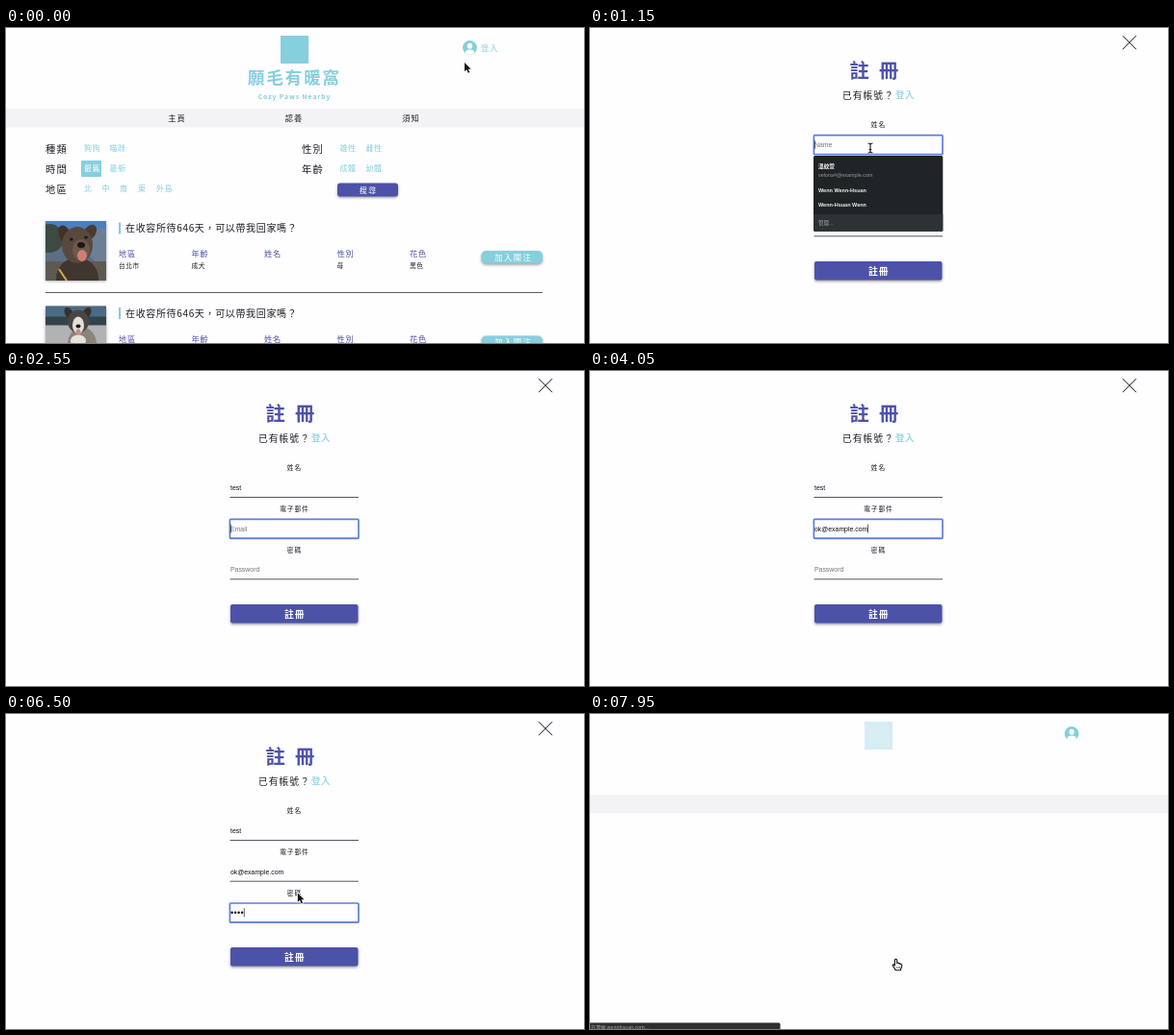
Animation of 600 by 328 pixels, one loop 8 s. Source, as an HTML page with a canvas:

```html
<!DOCTYPE html>
<html lang="zh-Hant">
<head>
<meta charset="utf-8">
<title>註冊</title>
<style>
html, body { margin: 0; width: 100%; height: 100%; overflow: hidden; background: #fefdff; }
canvas { display: block; width: 100vw; height: 100vh; }
</style>
</head>
<body>
<canvas></canvas>
<script>
const W = 600, H = 328, LOOP = 8000;
const canvas = document.querySelector('canvas');
const ctx = canvas.getContext('2d');
const CJK = '"Noto Sans CJK TC", "Noto Sans CJK JP", "Noto Sans CJK", sans-serif';
const SANS = '"Liberation Sans", sans-serif';
const PAPER = '#fefdff', AQUA = '#86cfdd', INDIGO = '#4c52a8', INK = '#1c1c1f';
const EMAIL = 'ok@example.com';
const NAME_KEYS = [1350, 1450, 1550, 1650];
const EMAIL_KEYS = [2700, 2750, 2950, 3000, 3200, 3500, 3600, 3650, 3750, 3900, 3950, 4000, 4000, 4050];
const PASS_KEYS = [6100, 6150, 6150, 6250];
const CARET_OFF = [2350, 4550, 5650];

// Cursor stops: time, x, y
const ENTER_PATH = [[0, 476, 36], [80, 476, 36], [380, 499, 21], [620, 499, 21], [1050, 291, 125]];
const SUBMIT_PATH = [[5300, 292, 128], [5350, 292, 128], [5500, 295, 152], [6380, 295, 152],
  [6720, 322, 271], [6900, 319, 261]];

const clamp = v => Math.min(1, Math.max(0, v));
const ramp = (t, a, b) => { const u = clamp((t - a) / (b - a)); return u * u * (3 - 2 * u); };
const typed = (keys, t) => keys.filter(k => t >= k).length;

function text(s, x, y, size, color, { weight = 400, gap = 0, font = CJK, center = false } = {}) {
  ctx.font = `${weight} ${size}px ${font}`;
  ctx.letterSpacing = gap + 'px';
  ctx.fillStyle = color;
  const left = center ? x - (ctx.measureText(s).width - gap) / 2 : x;
  ctx.fillText(s, left, y + size * 0.37);
}

function rect(x, y, w, h, color, r = 0) {
  ctx.fillStyle = color;
  ctx.beginPath();
  ctx.roundRect(x, y, w, h, r);
  ctx.fill();
}

function raised(x, y, w, h, color, r) {
  ctx.save();
  ctx.shadowColor = 'rgba(0,0,0,.38)';
  ctx.shadowBlur = 3;
  ctx.shadowOffsetY = 1.3;
  rect(x, y, w, h, color, r);
  ctx.restore();
}

function oval(x, y, rx, ry, color, turn = 0) {
  ctx.fillStyle = color;
  ctx.beginPath();
  ctx.ellipse(x, y, rx, ry, turn, 0, 7);
  ctx.fill();
}

function line(x1, y1, x2, y2, color, width = 1) {
  ctx.strokeStyle = color;
  ctx.lineWidth = width;
  ctx.beginPath();
  ctx.moveTo(x1, y1);
  ctx.lineTo(x2, y2);
  ctx.stroke();
}

function avatar(x, y) {
  ctx.save();
  ctx.beginPath();
  ctx.arc(x, y, 7.4, 0, 7);
  ctx.clip();
  rect(x - 8, y - 8, 16, 16, AQUA);
  oval(x, y - 1.8, 2.6, 2.9, '#fff');
  oval(x, y + 5.2, 4.6, 3.2, '#fff');
  ctx.restore();
}

function logo(alpha) {
  ctx.globalAlpha *= alpha;
  rect(285, 8, 29, 29, AQUA);
  ctx.globalAlpha /= alpha;
}

function photo(y, drawScene) {
  raised(41, y, 63, 62, '#777');
  ctx.save();
  ctx.beginPath();
  ctx.rect(41, y, 63, 62);
  ctx.clip();
  ctx.translate(41, y);
  drawScene();
  ctx.restore();
}

function brownDog() {
  rect(0, 0, 63, 62, '#5b6f83');
  rect(0, 0, 63, 18, '#4a7fc0');
  oval(4, 18, 15, 15, '#3d4a42');
  oval(58, 26, 14, 18, '#6d7f93');
  rect(0, 42, 63, 20, '#5e5a52');
  oval(33, 60, 22, 22, '#40352f');
  oval(20, 14, 6, 10, '#40322b', -0.4);
  oval(46, 12, 6, 9, '#4a3a31', 0.6);
  oval(33, 25, 16, 19, '#59483d');
  oval(37, 30, 9, 11, '#6c594c');
  oval(38, 36, 5, 6, '#cf7d78');
  oval(37, 25, 4, 3, '#1b1817');
  oval(27, 19, 1.8, 1.6, '#1b1817');
  oval(42, 17, 1.8, 1.6, '#1b1817');
  line(14, 50, 22, 62, '#d6ab4a', 2);
}

function paleDog() {
  rect(0, 0, 63, 62, '#b1b2b4');
  rect(0, 0, 63, 15, '#4a6a86');
  rect(0, 11, 63, 9, '#33424a');
  oval(38, 40, 15, 18, '#8c8479');
  oval(24, 7, 4, 6, '#35312f', -0.5);
  oval(43, 7, 4, 6, '#35312f', 0.5);
  oval(34, 16, 11, 12, '#4b4643');
  oval(34, 20, 6, 9, '#e3ded9');
  oval(34, 21, 2.5, 2, '#201d1c');
  oval(34, 27, 2.4, 3, '#c98a88');
  oval(34, 36, 8, 6, '#e6e3df');
}

function card(y, scene) {
  photo(y, scene);
  rect(117, y + 1.5, 2.2, 12, AQUA);
  text('在收容所待646天，可以帶我回家嗎？', 124, y + 7.5, 10, INK, { gap: 0.65 });
  ['地區', '年齡', '姓名', '性別', '花色'].forEach((s, i) =>
    text(s, 117 + i * 75.5, y + 34, 8.2, INDIGO, { weight: 500, gap: 0.9 }));
  ['台北市', '成犬', '', '母', '黑色'].forEach((s, i) =>
    text(s, 117 + i * 75.5, y + 47, 6.7, INK, { gap: 0.6 }));
  raised(493.5, y + 31, 63.5, 13.5, AQUA, 5);
  text('加入關注', 526, y + 37.5, 8.3, '#fff', { weight: 500, gap: 1.5, center: true });
  line(41, y + 74.5, 557, y + 74.5, '#5c5c60');
}

function filterRow(label, x, y, options) {
  text(label, x, y, 10.3, INK, { weight: 500, gap: 1.2 });
  options.forEach(([s, left, color = AQUA]) => text(s, left, y - 0.5, 8, color, { gap: 0.4 }));
}

function home() {
  rect(0, 0, W, H, PAPER);
  logo(1);
  text('願毛有暖窩', 298.5, 52, 17.4, AQUA, { weight: 900, gap: 2, center: true });
  text('Cozy Paws Nearby', 299, 72, 6.7, AQUA, { weight: 700, gap: 1, center: true });
  avatar(481.5, 20.5);
  text('登入', 493, 20.5, 8.2, AQUA, { gap: 1 });
  rect(0, 84, W, 19.5, '#f3f2f4');
  ['主頁', '認養', '須知'].forEach((s, i) =>
    text(s, 177 + i * 121.5, 94, 8.2, INK, { weight: 500, gap: 1, center: true }));

  rect(78, 138, 21, 17, AQUA, 1);
  filterRow('種類', 41, 126, [['狗狗', 81], ['喵咪', 107.5]]);
  filterRow('時間', 41, 147, [['最舊', 81, '#fff'], ['最新', 107.5]]);
  filterRow('地區', 41, 168, [['北', 81], ['中', 99.5], ['南', 118], ['東', 137], ['外島', 156]]);
  filterRow('性別', 307, 126, [['雄性', 346.5], ['雌性', 373.5]]);
  filterRow('年齡', 307, 147, [['成體', 346.5], ['幼體', 373.5]]);
  raised(344, 161.5, 63, 14, INDIGO, 3);
  text('搜尋', 375.5, 168.5, 8.2, '#fff', { weight: 500, gap: 1.2, center: true });

  card(201, brownDog);
  card(289.5, paleDog);
}

function field(label, hint, value, y, focused, caretOn) {
  text(label, 299, y - 20.5, 6.7, INK, { weight: 500, gap: 0.9, center: true });
  line(232.5, y + 10, 366, y + 10, '#58585c');
  if (focused) {
    ctx.strokeStyle = '#5b80dc';
    ctx.lineWidth = 1.7;
    ctx.beginPath();
    ctx.roundRect(232.4, y - 9.8, 133.6, 20, 0.8);
    ctx.stroke();
  }
  let end = 233;
  if (value[0] === '•') {
    for (let i = 0; i < value.length; i++) oval(234.6 + i * 3.5, y, 1.25, 1.25, '#111');
    end += value.length * 3.5;
  } else {
    text(value || hint, 233, y, 6.9, value ? '#111' : '#75757a', { font: SANS });
    if (value) end += ctx.measureText(value).width;
  }
  if (focused && caretOn) line(end + 0.3, y - 4.5, end + 0.3, y + 4.5, '#222', 0.7);
}

function suggestions() {
  rect(232, 133, 134.3, 78.7, '#202426', 1.5);
  rect(232, 194, 134.3, 17.7, '#2d3234', [0, 0, 1.5, 1.5]);
  text('溫紋萱', 237, 144, 5.7, '#eee', { weight: 700 });
  text('velona4@example.com', 237, 153, 5.4, '#96999a', { font: SANS });
  text('Wenn Wenn-Hsuan', 237, 168.5, 5.5, '#eee', { weight: 700, font: SANS });
  text('Wenn-Hsuan Wenn', 237, 184, 5.5, '#eee', { weight: 700, font: SANS });
  text('管理...', 237, 203, 5.4, '#a6a9aa');
}

function register(t) {
  rect(0, 0, W, H, PAPER);
  line(553, 8.2, 567, 22.2, '#111');
  line(567, 8.2, 553, 22.2, '#111');
  text('註冊', 295, 44, 20.3, INDIGO, { weight: 700, gap: 10.2, center: true });
  text('已有帳號？', 262, 70, 9.7, INK, { gap: 1.1 });
  text('登入', 317, 69.5, 9.5, '#72cbe0', { gap: 0.6 });

  const focus = t < 1100 ? '' : t < 1950 ? 'name' : t < 5000 ? 'email' : t < 7000 ? 'pass' : '';
  const caretOn = !CARET_OFF.some(a => t >= a && t < a + 200);
  field('姓名', 'Name', 'test'.slice(0, typed(NAME_KEYS, t)), 121.5, focus === 'name', caretOn);
  field('電子郵件', 'Email', EMAIL.slice(0, typed(EMAIL_KEYS, t)), 164.2, focus === 'email', caretOn);
  field('密碼', 'Password', '•'.repeat(typed(PASS_KEYS, t)), 206.8, focus === 'pass', caretOn);

  if (t >= 7000 && t < 7400)
    text('請輸入密碼', 299, 228, 7, '#b3303f', { weight: 500, gap: 0.7, center: true });

  const hover = ramp(t, 6780, 6950), grow = 2 * hover;
  if (t >= 7000) rect(229, 240.8, 141, 24.4, '#b4dce8', 2.5);
  raised(233 - grow, 243 - grow / 4, 132.5 + 2 * grow, 19.6 + grow / 2,
    `rgb(${76 + 31 * hover},${82 + 29 * hover},${168 + 18 * hover})`, 2);
  text('註冊', 299.3, 253, 9.8, '#fff', { weight: 700, gap: 0.8, center: true });

  if (t >= 1100 && t < 1350) suggestions();
}

function loading(t) {
  rect(0, 0, W, H, PAPER);
  if (t >= 7750) {
    rect(0, 84, W, 19.5, '#f3f2f4');
    avatar(500, 20.5);
  }
  if (t > 7850) logo(0.35 * clamp((t - 7850) / 100));
}

function statusBar() {
  rect(-2, 321.5, 199.5, 9, '#2f2f31', 1.5);
  text('正在等候 wennhsuan.com...', -4, 326, 5.1, '#a9a9ab');
}

function along(path, t) {
  let i = 0;
  while (i < path.length - 2 && t >= path[i + 1][0]) i++;
  const [a, x1, y1] = path[i], [b, x2, y2] = path[i + 1], u = ramp(t, a, b);
  return [x1 + (x2 - x1) * u, y1 + (y2 - y1) * u];
}

const ARROW = new Path2D('M0 0V9.2L2.2 7.3L3.7 10.8L5.3 10.1L3.8 6.7H6.7Z');
const BEAM = new Path2D('M-2.5-5Q0-5 0-3.5Q0-5 2.5-5M0-3.5V3.5M-2.5 5Q0 5 0 3.5Q0 5 2.5 5M-1.3 1.5H1.3');
const HAND = new Path2D('M-2.6 1V-4.6Q-2.4-6-1.2-5.8Q-.4-5.6-.3-4.5V-1.6Q.8-2.5 1.5-1.2' +
  'Q2.6-1.8 3.2-.6Q4.7-.8 4.8 .8Q4.8 3 3.6 4.4V5.8H-1.8Q-2 4.6-4.4 1.6Q-5.2 .2-4.2-.1Q-3.4-.2-2.6 1Z');

function cursor(t) {
  if (t >= 1350 && t < 5300) return;
  const [x, y] = along(t < 1350 ? ENTER_PATH : SUBMIT_PATH, t);
  const inForm = x > 232 && x < 367;
  const overField = inForm && t > 400 && [111, 154, 197].some(top => y > top - 3 && y < top + 21);
  const overLink = t < 800 ? x > 488 && y < 28 : inForm && y > 241 && y < 265;
  ctx.save();
  ctx.translate(x, y);
  ctx.lineJoin = 'round';
  if (overField) {
    ctx.strokeStyle = '#fff';
    ctx.lineWidth = 2.4;
    ctx.stroke(BEAM);
    ctx.strokeStyle = '#111';
    ctx.lineWidth = 1.1;
    ctx.stroke(BEAM);
  } else if (overLink) {
    ctx.fillStyle = '#fff';
    ctx.strokeStyle = '#111';
    ctx.lineWidth = 1.1;
    ctx.fill(HAND);
    ctx.stroke(HAND);
    for (const k of [0, 1.5, 3]) line(-0.3 + k, 2, -0.3 + k, 4, '#333', 0.6);
  } else {
    ctx.strokeStyle = '#fff';
    ctx.lineWidth = 1.5;
    ctx.stroke(ARROW);
    ctx.fillStyle = '#111';
    ctx.fill(ARROW);
  }
  ctx.restore();
}

function draw(t) {
  const shown = ramp(t, 420, 850);
  if (shown < 1) home();
  if (t >= 7700) loading(t);
  else if (shown > 0) {
    ctx.globalAlpha = shown;
    register(t);
    ctx.globalAlpha = 1;
  }
  if (t >= 7250) statusBar();
  cursor(t);
}

function frame(now) {
  const dpr = window.devicePixelRatio || 1;
  const w = Math.round(innerWidth * dpr), h = Math.round(innerHeight * dpr);
  if (canvas.width !== w || canvas.height !== h) {
    canvas.width = w;
    canvas.height = h;
  }
  ctx.setTransform(w / W, 0, 0, h / H, 0, 0);
  draw(now % LOOP);
  requestAnimationFrame(frame);
}
requestAnimationFrame(frame);
</script>
</body>
</html>
```
